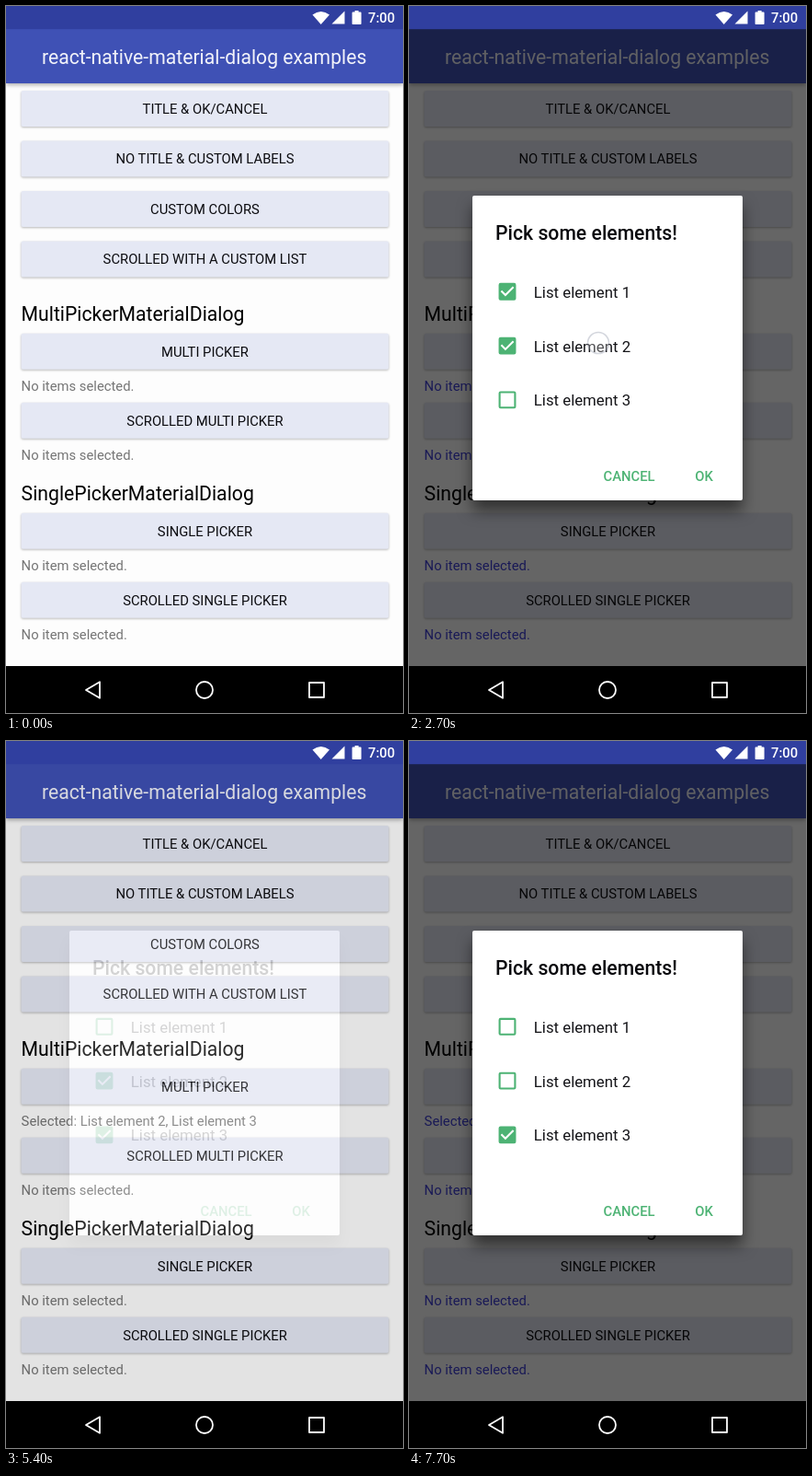
An HTML page for the animation above (8 s loop, 432 by 768 pixels).

```html
<!DOCTYPE html>
<html lang="en">
<head>
<meta charset="utf-8">
<title>Material dialog demo</title>
<style>
  html, body { margin: 0; width: 100%; height: 100%; overflow: hidden; background: #000; }
  svg { display: block; width: 432px; height: 768px; }
  text { font-family: Roboto, "Open Sans", sans-serif; white-space: pre; }
  .head { font-size: 21.2px; fill: #000; }
  .bar { fill: #fff; opacity: .93; }
  .label { font-size: 14.8px; fill: #0c0c10; text-anchor: middle; }
  .sub { font-size: 14.8px; fill: #757575; }
  .title { font-size: 21.2px; font-weight: 500; fill: #0a0a0e; }
  .item { font-size: 16.8px; fill: #141418; }
  .action { font-size: 14.8px; font-weight: 500; fill: #4db374; }
  .clock { font-size: 14.8px; font-weight: 500; fill: #fff; }
  .btn { fill: #e5e8f4; filter: drop-shadow(0 1.8px 1.2px rgba(0, 0, 0, .27)); }
  .appbar { fill: #3f51b5; filter: drop-shadow(0 2px 2px rgba(0, 0, 0, .3)); }
  .card { fill: #fff; filter: drop-shadow(0 11px 8px rgba(0, 0, 0, .5)); }
  .nav { fill: none; stroke: #fff; stroke-width: 1.8; stroke-linejoin: round; }
</style>
</head>
<body>
<svg id="stage" viewBox="0 0 432 768">
  <rect width="432" height="768" fill="#fdfdfd"/>
  <g id="page"></g>
  <rect class="appbar" y="25" width="432" height="59"/>
  <text class="head bar" x="39" y="63">react-native-material-dialog examples</text>

  <g id="modal">
    <rect y="25" width="432" height="692" opacity=".6"/>
    <rect class="card" x="69" y="206" width="294" height="331" rx="2"/>
    <text class="title" x="94" y="253.5">Pick some elements!</text>
    <g id="list"></g>
    <text class="action" x="211.5" y="515.5">CANCEL</text>
    <text class="action" x="311.3" y="515.5">OK</text>
  </g>

  <circle id="touch" r="11.5" fill="#fff" fill-opacity=".4" stroke="#7d8699" stroke-opacity=".5" stroke-width="1.6"/>

  <rect width="432" height="25.2" fill="#303f9f"/>
  <g fill="#fff">
    <path d="M333.5 9.6Q342.7 2.6 352 9.6L342.7 20Z"/>
    <path d="M368.5 5.5V19.5H354.5Z"/>
    <path d="M379.6 5h4v1.6h2.2q.8 0 .8.8v11.8q0 .8-.8.8h-8.4q-.8 0-.8-.8V7.4q0-.8.8-.8h2.2z"/>
  </g>
  <text class="clock" x="394" y="18.3">7:00</text>

  <rect y="717" width="432" height="51"/>
  <g class="nav">
    <path d="M87 743L102 734.2V751.8Z"/>
    <circle cx="216" cy="743" r="9"/>
    <rect x="330" y="735" width="16" height="16"/>
  </g>
</svg>
<script>
const LOOP = 8000, STEP = 100;
const $ = id => document.getElementById(id);

function add(parent, tag, attrs, text) {
  const el = document.createElementNS('http://www.w3.org/2000/svg', tag);
  for (const k in attrs) el.setAttribute(k, attrs[k]);
  if (text) el.textContent = text;
  return parent.appendChild(el);
}

const buttons = [
  [111.5, 'TITLE & OK/CANCEL'],
  [166, 'NO TITLE & CUSTOM LABELS'],
  [220.5, 'CUSTOM COLORS'],
  [275, 'SCROLLED WITH A CUSTOM LIST'],
  [375.3, 'MULTI PICKER'],
  [450.3, 'SCROLLED MULTI PICKER'],
  [570.3, 'SINGLE PICKER'],
  [645.3, 'SCROLLED SINGLE PICKER']
].map(([y, name]) => {
  const box = add($('page'), 'rect', { class: 'btn', x: 16.5, y: y - 19.5, width: 400, height: 39, rx: 2 });
  add($('page'), 'text', { class: 'label', x: 216.5, y: y + 5.4 }, name);
  return box;
});
const picker = buttons[4];

[[341.5, 'MultiPickerMaterialDialog'], [536.7, 'SinglePickerMaterialDialog']]
  .forEach(([y, s]) => add($('page'), 'text', { class: 'head', x: 16.6, y }, s));

const subs = [[418, 'No items selected.'], [493, 'No items selected.'],
  [613, 'No item selected.'], [688, 'No item selected.']]
  .map(([y, s]) => add($('page'), 'text', { class: 'sub', x: 16.6, y }, s));

// times at which each row's checkbox flips
const flips = [[2200, 3900], [2700, 7300], [3300]];
const rows = flips.map((_, i) => {
  const y = 310.3 + i * 58.8;
  add($('list'), 'text', { class: 'item', x: 135.8, y: y + 6.5 }, 'List element ' + (i + 1));
  const icon = add($('list'), 'g', { transform: `translate(107 ${y}) scale(1.05)` });
  const box = add(icon, 'rect', { x: -8, y: -8, width: 16, height: 16, rx: 1, stroke: '#4db374', 'stroke-width': 2 });
  const tick = add(icon, 'path', { d: 'M-6.3-.7L-2 3.6L6.3-4.7', fill: 'none', stroke: '#fff', 'stroke-width': 2 });
  return { box, tick };
});

// down, up, x, y
const touches = [
  [600, 1000, 306, 368], [2000, 2200, 206, 306], [2500, 2700, 206, 366],
  [3100, 3300, 206, 424], [3600, 3900, 206, 304], [4900, 5100, 322, 508],
  [6100, 6500, 306, 367], [7100, 7300, 206, 366]
];
// time, modal opacity
const fades = [[0, 0], [1000, 0], [1300, 1], [5150, 1], [5450, 0], [6600, 0], [6900, 1], [LOOP, 1]];
// time, button press amount
const presses = [[0, 0], [600, 0], [800, 1], [1150, 1], [1400, 0], [6100, 0], [6300, 1], [6750, 1], [7000, 0], [LOOP, 0]];

const clamp = v => Math.max(0, Math.min(1, v));
const mix = (a, b, k) => `rgb(${a.map((v, i) => Math.round(v + (b[i] - v) * k))})`;

function track(keys, t) {
  const i = keys.findIndex(k => k[0] > t);
  const [t0, a] = keys[i - 1], [t1, b] = keys[i];
  return a + (b - a) * (t - t0) / (t1 - t0);
}

function draw(t) {
  const open = track(fades, t);
  $('modal').setAttribute('opacity', open);
  picker.style.fill = mix([229, 232, 244], [211, 214, 229], track(presses, t));

  const tint = mix([117, 117, 117], [62, 62, 215], clamp(open * 2 - 1));
  subs.forEach(s => s.style.fill = tint);
  subs[0].textContent = t < 5150 ? 'No items selected.' : 'Selected: List element 2, List element 3';

  rows.forEach(({ box, tick }, i) => {
    const on = flips[i].filter(f => f <= t).length % 2;
    box.setAttribute('fill', on ? '#4db374' : '#fff');
    tick.setAttribute('opacity', on);
  });

  const hit = touches.find(([a, b]) => t >= a && t < b + 100);
  $('touch').setAttribute('opacity', hit ? clamp((hit[1] + 100 - t) / 150) : 0);
  if (hit) $('touch').setAttribute('transform', `translate(${hit[2]} ${hit[3]})`);
}

const start = performance.now();
function tick() {
  const t = (performance.now() - start) % LOOP;
  draw(Math.floor(t / STEP) * STEP);
  requestAnimationFrame(tick);
}
tick();
</script>
</body>
</html>
```
